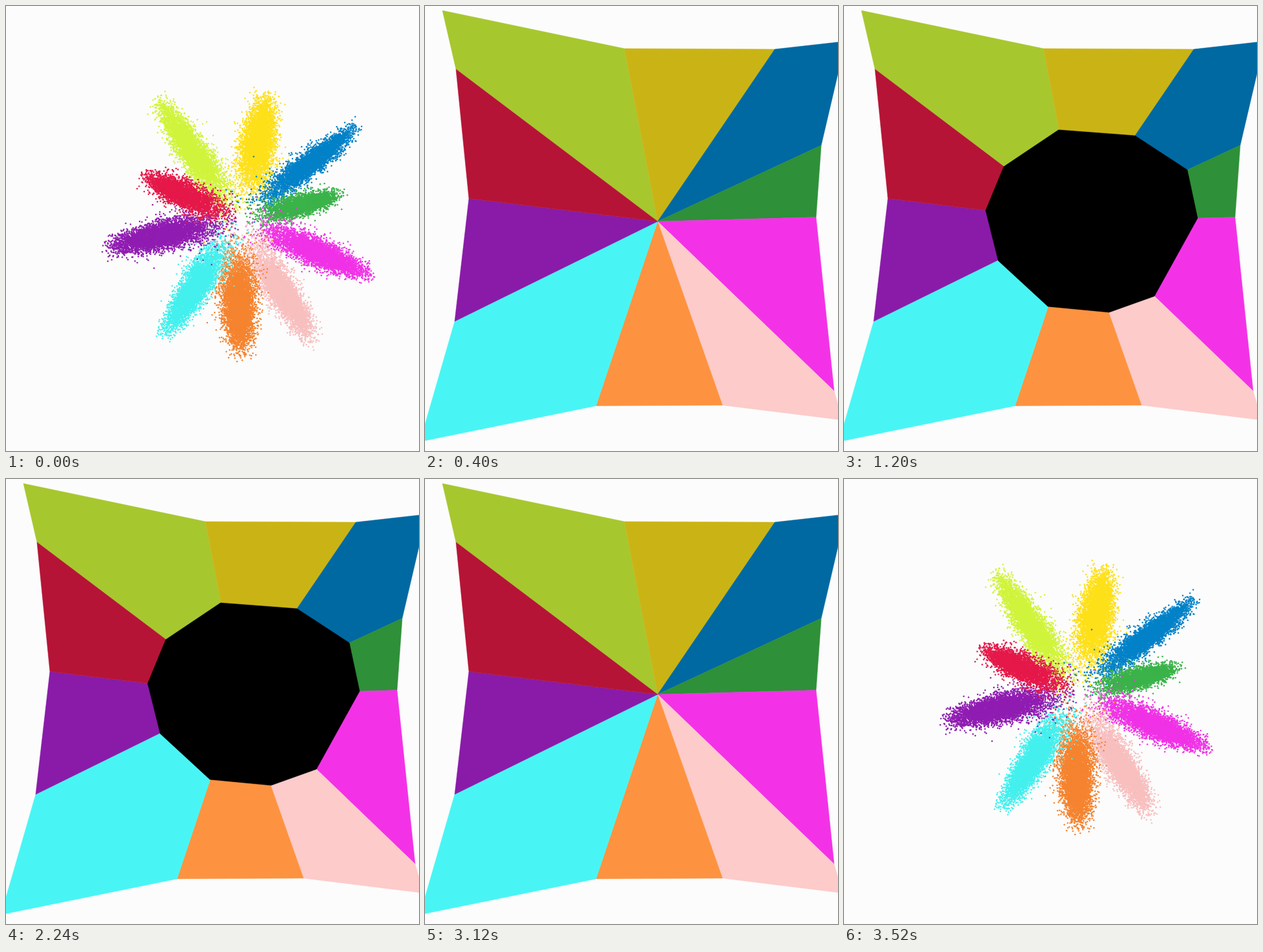
These frames come from a looping animation (640x690 px, 3.6 s). An HTML page with a canvas:

```html
<!DOCTYPE html>
<html lang="en">
<head>
<meta charset="utf-8">
<title>Clusters and class regions</title>
<style>
  html, body { margin: 0; width: 100%; height: 100%; overflow: hidden; background: #fcfcfc; }
  canvas { display: block; }
</style>
</head>
<body>
<canvas id="stage" width="640" height="690"></canvas>
<script>
const W = 640, H = 690, LOOP = 3600;
const ctx = document.getElementById('stage').getContext('2d');
const center = [360.5, 334];

// dot colour, inner tip, outer tip, spread across the petal, dots
const petals = [
  ['#d0f43c', [362, 336], [228, 133], 10, 5200],
  ['#fee01a', [373, 322], [405, 122], 12, 5200],
  ['#0382c8', [370, 323], [557, 177], 8, 5000],
  ['#3bb34a', [372, 331], [531, 289], 7.2, 3600],
  ['#f032e6', [371, 333], [578, 424], 9.2, 5200],
  ['#f8bfbf', [366, 341], [484, 533], 10, 5200],
  ['#f58430', [357, 345], [364, 556], 12, 5600],
  ['#44f0ee', [356, 336], [238, 522], 10, 5200],
  ['#901db2', [361, 329], [142, 378], 10, 5200],
  ['#e5194a', [360, 331], [203, 259], 9, 4200]
];

// region colour and its outer edge, clockwise
const regions = [
  ['#a7c72f', [48, 98], [27, 7], [309, 66]],
  ['#cab415', [309, 66], [542, 67]],
  ['#0069a2', [542, 67], [651.7, 54.7], [614, 216]],
  ['#2e9038', [614, 216], [606, 327.5]],
  ['#f332e7', [606, 327.5], [634, 597]],
  ['#fccbca', [634, 597], [647, 642], [461, 619]],
  ['#fd9340', [461, 619], [265, 620]],
  ['#48f5f4', [265, 620], [-7.8, 675.5], [46, 489]],
  ['#891ba8', [46, 489], [68, 298.5]],
  ['#b51436', [68, 298.5], [48, 98]]
];

const hole = [
  [332.5, 192], [451, 201], [532, 254], [548, 329], [481, 450],
  [411, 475], [316, 466], [239, 395], [219.5, 317], [247.5, 249]
];

function makeRandom(seed) {
  return () => {
    seed = (seed + 0x6d2b79f5) | 0;
    let v = Math.imul(seed ^ (seed >>> 15), 1 | seed);
    v = (v + Math.imul(v ^ (v >>> 7), 61 | v)) ^ v;
    return ((v ^ (v >>> 14)) >>> 0) / 4294967296;
  };
}

function layer(draw) {
  const canvas = document.createElement('canvas');
  canvas.width = W;
  canvas.height = H;
  const g = canvas.getContext('2d');
  g.fillStyle = '#fcfcfc';
  g.fillRect(0, 0, W, H);
  draw(g);
  return canvas;
}

function polygon(g, points, color) {
  g.beginPath();
  points.forEach(([x, y]) => g.lineTo(x, y));
  g.closePath();
  g.fillStyle = g.strokeStyle = color;
  g.lineWidth = 0.5;
  g.fill();
  g.stroke();
}

function drawDots(g) {
  const rnd = makeRandom(17);
  const gauss = () =>
    Math.sqrt(-2 * Math.log(1 - rnd())) * Math.cos(2 * Math.PI * rnd());
  for (const [color, [x0, y0], [x1, y1], spread, count] of petals) {
    const dx = x1 - x0, dy = y1 - y0, len = Math.hypot(dx, dy);
    g.fillStyle = color;
    for (let i = 0; i < count; i++) {
      const stray = rnd() < 0.018;
      const along = stray ? rnd() * 0.5 : ((rnd() + rnd() + rnd()) / 3) ** 0.85;
      const wide = stray ? 1.8 : rnd() < 0.05 ? 1.5 : 1;
      const off = gauss() * spread * wide * (1.3 - 0.55 * along) / len;
      g.beginPath();
      g.arc(x0 + dx * along - dy * off, y0 + dy * along + dx * off, 1.25, 0, 2 * Math.PI);
      g.fill();
    }
  }
}

function drawRegions(g) {
  for (const [color, ...edge] of regions) polygon(g, [center, ...edge], color);
}

const dots = layer(drawDots);
const fans = layer(drawRegions);
const ring = layer(g => {
  drawRegions(g);
  polygon(g, hole, '#000');
});

function sceneAt(t) {
  if (t < 400 || t >= 3200) return dots;
  return t >= 1200 && t < 2400 ? ring : fans;
}

const start = performance.now();
function render() {
  const t = (performance.now() - start) % LOOP;
  ctx.drawImage(sceneAt(t), 0, 0);
  requestAnimationFrame(render);
}
render();
</script>
</body>
</html>
```
